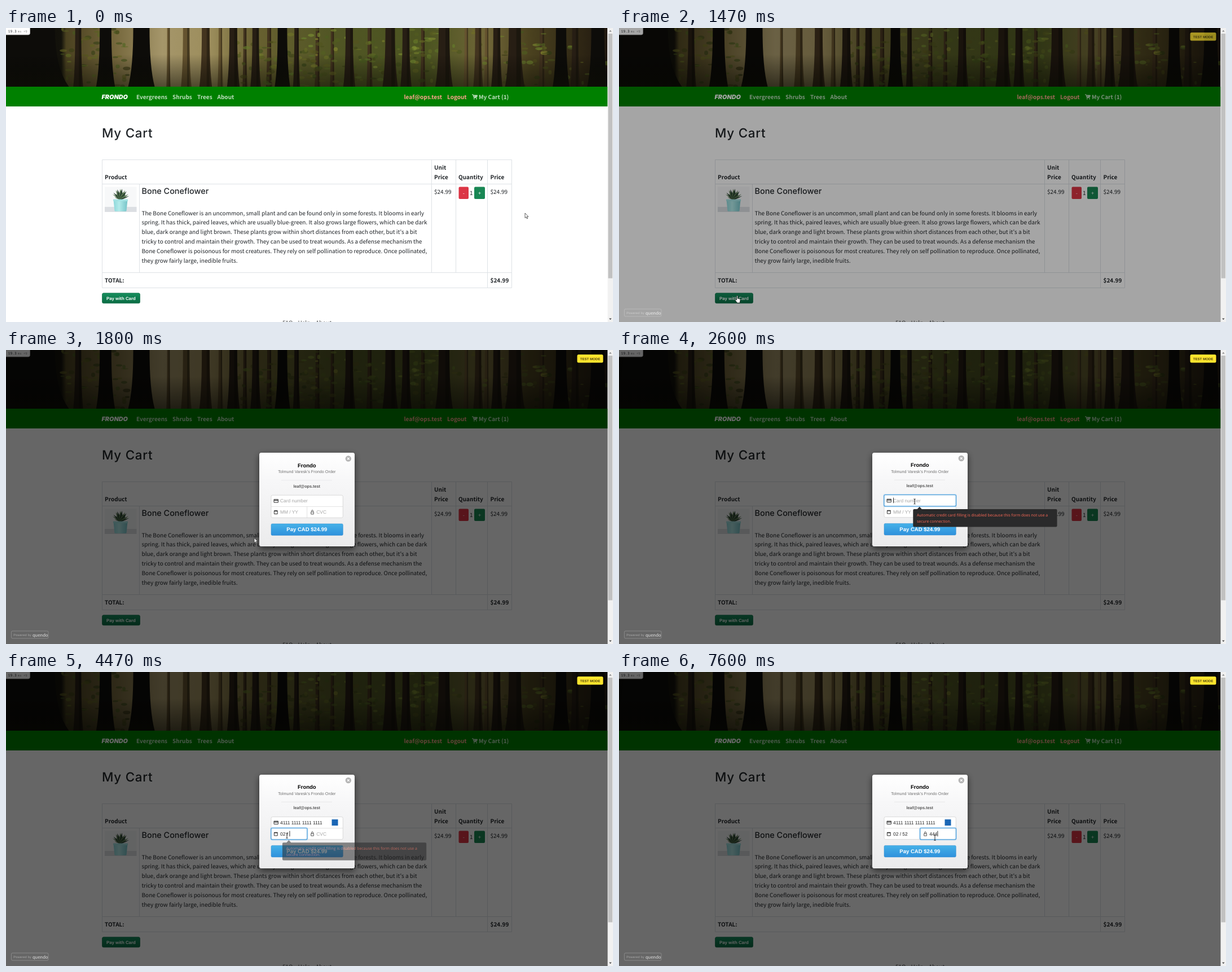
Recreate the animation shown at these times as an HTML page. Size 1076 px wide and 521 px high, loop 8000 ms.

```html
<!DOCTYPE html>
<html lang="en">
<head>
<meta charset="utf-8">
<title>Cart checkout</title>
<style>
html,body{margin:0;width:100%;height:100%;overflow:hidden;background:#fff}
svg{display:block;width:100vw;height:100vh}
text{font:10.02px "Noto Sans CJK JP","Noto Sans CJK SC","Noto Sans CJK","Noto Sans",sans-serif;fill:#212529;text-rendering:geometricPrecision;white-space:pre}
.b{font-weight:700}
.nav text{font-weight:700;fill:#bfdfbf}
.nav .user{fill:#ffa38f}
.head{font-family:Inter,sans-serif;font-weight:500}
.ui,.ui text{font-family:"Liberation Sans",Arial,sans-serif}
.mid{text-anchor:middle}
.mono{font:6.2px "Noto Sans Mono","DejaVu Sans Mono",monospace}
.field{font-size:8.4px}
.hint text{font:6.92px "Open Sans","Noto Sans",sans-serif;fill:#ff6b58}
.line{fill:none;stroke:#dee2e6}
.icon{fill:none;stroke:#333}
</style>
</head>
<body>
<svg viewBox="0 0 1076 521" preserveAspectRatio="none">
<defs>
  <linearGradient id="sky" gradientUnits="userSpaceOnUse" x1="0" x2="1066">
    <stop offset="0" stop-color="#0b0b08"/><stop offset=".092" stop-color="#13120b"/>
    <stop offset=".1" stop-color="#4a4120"/><stop offset=".18" stop-color="#75673c"/>
    <stop offset=".26" stop-color="#a5966a"/><stop offset=".34" stop-color="#9c8d5c"/>
    <stop offset=".41" stop-color="#696131"/><stop offset=".55" stop-color="#505524"/>
    <stop offset=".7" stop-color="#4c5421"/><stop offset=".8" stop-color="#706638"/>
    <stop offset=".87" stop-color="#4b421f"/><stop offset="1" stop-color="#20180f"/>
  </linearGradient>
  <linearGradient id="shade" x2="0" y2="1">
    <stop offset=".45" stop-color="#000" stop-opacity="0"/><stop offset="1" stop-color="#0d0e04" stop-opacity=".55"/>
  </linearGradient>
  <linearGradient id="green" x2="0" y2="1"><stop stop-color="#158e5d"/><stop offset="1" stop-color="#0a6b43"/></linearGradient>
  <linearGradient id="blue" x2="0" y2="1"><stop stop-color="#45b1e8"/><stop offset="1" stop-color="#2f91dc"/></linearGradient>
  <linearGradient id="panel" x2="0" y2="1"><stop stop-color="#fff"/><stop offset=".3" stop-color="#f7f7f8"/><stop offset="1" stop-color="#ebebec"/></linearGradient>
  <linearGradient id="pot" x2="1" y2="0"><stop stop-color="#8ed7da"/><stop offset=".4" stop-color="#b3ebea"/><stop offset="1" stop-color="#76c3c8"/></linearGradient>
  <clipPath id="banner"><path d="M0 0H1066V104H0z"/></clipPath>
  <filter id="drop" x="-20%" y="-20%" width="140%" height="150%"><feDropShadow dx="0" dy="4" stdDeviation="6" flood-opacity=".6"/></filter>
  <path id="arrow" d="M0 0V8.6L2 6.8 3.4 10 4.8 9.4 3.4 6.3H6z" fill="#fff" stroke="#222" stroke-width=".7"/>
  <path id="hand" d="M-.8 7V.6C-.8-.4 1-.4 1 .6V5L4.6 5.6Q5.8 6 5.5 7.4L4.6 12.6H0L-3.2 8.2C-3.4 6.8-2 6.3-.8 7.6z" fill="#fff" stroke="#111" stroke-width=".7"/>
  <path id="beam" d="M-1.6-4.6Q0-4.6 0-3.8Q0-4.6 1.6-4.6M0-4V4M-1.6 4.6Q0 4.6 0 3.8Q0 4.6 1.6 4.6" fill="none" stroke="#111" stroke-width=".9"/>
</defs>

<g clip-path="url(#banner)">
  <path d="M0 0H1066V104H0z" fill="url(#sky)"/>
  <g id="wood"></g>
  <path d="M0 0H1066V104H0z" fill="url(#shade)"/>
</g>
<path d="M0 104H1066.5V139H0z" fill="green"/>
<g class="nav">
  <text x="169.5" y="125.8" style="font:italic 900 10.8px Inter,sans-serif;fill:#fff">FRONDO</text>
  <text x="231" y="126">Evergreens</text><text x="295" y="126">Shrubs</text>
  <text x="339" y="126">Trees</text><text x="374.5" y="126">About</text>
  <text class="user" x="773" y="126" text-anchor="end">leaf@ops.test</text>
  <text class="user" x="782" y="126">Logout</text>
  <path d="M826 118H828L829.4 123.5H834.6M828.4 119.2H835.4L834.8 122H829z" fill="#bfdfbf" stroke="#bfdfbf"/>
  <circle cx="829.8" cy="125.6" r="1" fill="#bfdfbf"/><circle cx="834" cy="125.6" r="1" fill="#bfdfbf"/>
  <text x="838" y="126">My Cart (1)</text>
</g>

<text class="head" x="170" y="194" style="font-size:22.4px;letter-spacing:.75px">My Cart</text>
<path class="line" d="M170.5 233.5H896.5V460.5H170.5zM170.5 276.5H896.5M170.5 433.5H896.5M236.5 276.5V433.5M754.5 233.5V433.5M797.5 233.5V433.5M853.5 233.5V460.5"/>
<g class="b">
  <text class="b" x="175" y="268">Product</text>
  <text class="b" x="759" y="251">Unit</text><text class="b" x="759" y="268">Price</text>
  <text class="b" x="802" y="268">Quantity</text><text class="b" x="858.5" y="268">Price</text>
  <text class="b" x="175" y="451">TOTAL:</text><text class="b" x="858.5" y="451">$24.99</text>
</g>
<text x="759" y="294">$24.99</text><text x="858.5" y="294">$24.99</text>
<rect x="802.5" y="281.5" width="17.5" height="21.5" rx="2" fill="#dc3545"/>
<rect x="830" y="281.5" width="19" height="21.5" rx="2" fill="#198754"/>
<text class="mid" x="811.2" y="295.6" style="fill:#fff;font-size:9px">-</text>
<text class="mid" x="839.5" y="295.6" style="fill:#fff;font-size:9px">+</text>
<text x="822" y="295.6">1</text>

<path d="M175 281.5H231.5V326H175z" fill="#f7f8f9"/>
<path d="M175 317H231.5V326H175z" fill="#dcdfe3"/>
<g id="plant"></g>
<path d="M190.5 304H215.5L213.6 323.5Q213.4 325 211.5 325H194.5Q192.6 325 192.4 323.5z" fill="url(#pot)"/>
<path d="M190 303.4H216V307H190.3z" fill="#a3e2e3"/>

<text class="head" x="240.5" y="294" style="font-size:14.4px">Bone Coneflower</text>
<g id="blurb"></g>

<rect x="170.5" y="469.8" width="67" height="18" rx="2.5" fill="url(#green)" stroke="#0b6b44" stroke-width=".7"/>
<text class="ui mid b" x="203.9" y="481.7" style="font-size:7.84px;fill:#fff">Pay with Card</text>
<g style="opacity:.8"><text x="490" y="525.6">FAQ</text><text x="517.5" y="525.6">Help</text><text x="549" y="525.6">About</text></g>

<path d="M-1-1H42.5V9Q42.5 12 39.5 12H-1z" fill="#fff" stroke="#bbb" stroke-width=".8"/>
<text class="mono" x="3.8" y="8">19.3</text>
<text class="mono" x="20.8" y="8" style="font-size:5.6px;fill:#888">ms</text>
<text class="mono" x="31" y="8" style="font-size:5.6px;fill:#888">+9</text>

<path d="M1066.5 0H1076V521H1066.5z" fill="#f1f1f1"/>
<path d="M1067.5 10H1075V443.5H1067.5z" fill="#c1c1c1"/>
<path d="M1069 6.5H1073.6L1071.3 3.8z" fill="#888"/><path d="M1069 514.5H1073.6L1071.3 517.2z" fill="#505050"/>

<g id="veil" class="ui">
  <path d="M0 0H1066.5V521H0z" opacity=".6"/>
  <rect x="1012.5" y="8" width="46" height="14.5" rx="2.5" fill="#ffe52e"/>
  <text class="mid b" x="1035.5" y="17.5" style="font-size:6.1px;fill:#4d4510">TEST MODE</text>
  <rect x="9.5" y="498" width="65.5" height="13" rx="2" fill="none" stroke="#fff" stroke-opacity=".28" stroke-width=".8"/>
  <text x="13.3" y="506.6" style="font-size:5.6px;fill:#aaa;letter-spacing:.22px">Powered by</text>
  <text x="47" y="508" style="font:600 8.2px Lato,sans-serif;fill:#ccc">quendo</text>
</g>

<g id="modal" class="ui">
  <rect x="449" y="182" width="169" height="166" rx="3.5" fill="url(#panel)" filter="url(#drop)"/>
  <g id="inner">
    <circle cx="606.8" cy="192" r="5.2" fill="#b5b5b5"/>
    <path d="M604.9 190.1L608.7 193.9M608.7 190.1L604.9 193.9" stroke="#fff" stroke-width="1.2"/>
    <text class="mid b" x="533.3" y="207" style="font-size:9.52px;fill:#000">Frondo</text>
    <text class="mid" x="533.3" y="217.7" style="font-size:7.28px;fill:#707070">Tolmund Varesk's Frondo Order</text>
    <path d="M488 230.3H578" stroke="#e3e3e4" stroke-width=".7"/>
    <text class="mid b" x="533.3" y="243" style="font-size:7.28px;fill:#555">leaf@ops.test</text>
    <rect x="470" y="256.7" width="127.3" height="40" rx="2.5" fill="#fff" stroke="#ccc" stroke-width=".7"/>
    <path d="M470 276.8H597.3M533.6 276.8V296.7" stroke="#d4d4d4" stroke-width=".7"/>
    <rect id="badge" x="577.5" y="261.2" width="11" height="11" fill="#1a66b5"/>
    <g id="fields"></g>
    <path class="icon" d="M475 264.2H482.4V269.6H475z"/><path class="icon" d="M475 265.9H482.4" stroke-width="1.4"/>
    <path class="icon" d="M475.4 284.3H481.2V290H475.4z"/><path class="icon" d="M475.4 284.8H481.2" stroke-width="1.5"/>
    <path class="icon" d="M540.7 286.4H545.3V290.3H540.7zM541.5 286.2V285Q541.5 283.2 543 283.2T544.5 285V286.2" style="stroke:#555"/>
    <rect x="470" y="307.4" width="127.3" height="20.6" rx="2" fill="url(#blue)" stroke="#2d87cb" stroke-width=".5"/>
    <text class="mid b" x="533.3" y="320.5" style="font-size:9.52px;fill:#fff">Pay CAD $24.99</text>
  </g>
</g>

<g id="hint" class="hint">
  <path d="M523.5 282H528.7L532.7 277.8 536.7 282H774.5Q776.6 282 776.6 284V311.5Q776.6 313.5 774.5 313.5H523.5Q521.3 313.5 521.3 311.5V284Q521.3 282 523.5 282z" fill="#2a2a2b"/>
  <text x="528" y="295.2">Automatic credit card filling is disabled because this form does not use a</text>
  <text x="528" y="306.2">secure connection.</text>
</g>
<use id="cursor"/>
</svg>

<script>
const $ = id => document.getElementById(id);
function add(parent, tag, attrs, content = "") {
  const el = document.createElementNS("http://www.w3.org/2000/svg", tag);
  for (const k in attrs) el.setAttribute(k, attrs[k]);
  el.textContent = content;
  return parent.appendChild(el);
}
const clamp = v => Math.max(0, Math.min(1, v));
const ramp = (t, a, b) => clamp((t - a) / (b - a));

let seed = 11;
const rnd = () => (seed = seed * 16807 % 2147483647) / 2147483647;

function leaves(n, x0, x1, y0, y1, light) {
  for (let i = 0; i < n; i++) {
    const x = x0 + rnd() * (x1 - x0), y = y0 + rnd() * (y1 - y0);
    add($("wood"), "ellipse", {cx: x, cy: y, rx: 2 + rnd() * 5, ry: 1 + rnd() * 3,
      fill: `hsl(${58 + rnd() * 22} 48% ${light + rnd() * 16}%)`, opacity: .65});
  }
}
function trunks(list) {
  const bark = ["#0d0c09", "#271e14", "#43341f", "#65532f"];
  for (const [x, w, tone] of list) {
    const r = x + w, f = w * .12;
    add($("wood"), "path", {d: `M${x + f} 0H${r - f}Q${r - f} 70 ${r + f} 104H${x - f}Q${x + f} 70 ${x + f} 0`, fill: bark[tone]});
    if (tone) add($("wood"), "path", {d: `M${x + w * .6} 0H${r - f}V104H${x + w * .6}z`, fill: "#0b0905", opacity: .35});
  }
}
trunks([[285, 6, 3], [312, 15, 3], [345, 18, 2], [376, 8, 3], [420, 7, 2], [462, 9, 2], [548, 8, 2],
  [575, 7, 2], [640, 9, 2], [735, 8, 2], [812, 8, 3], [848, 8, 3], [945, 10, 2]]);
leaves(60, 100, 215, 0, 104, 15);
leaves(170, 395, 770, 20, 104, 17);
leaves(90, 500, 960, 0, 75, 22);
leaves(40, 880, 1066, 30, 104, 14);
trunks([[-5, 104, 0], [121, 14, 1], [163, 27, 0], [221, 38, 0], [394, 18, 1], [435, 15, 1], [479, 22, 0],
  [510, 10, 1], [600, 17, 1], [670, 22, 1], [701, 16, 1], [764, 25, 1], [830, 14, 2], [862, 16, 1],
  [888, 28, 1], [972, 24, 0], [1002, 14, 1], [1034, 30, 0]]);

for (let i = 0; i < 15; i++) {
  const a = -2.8 + i * .175, len = 13 + 7 * Math.abs(Math.sin(i * 2.1));
  const x = 203 + Math.cos(a) * len * .85, y = 304 + Math.sin(a) * len;
  add($("plant"), "path", {d: `M200.6 304Q${(201 + x) / 2 - 2} ${(303 + y) / 2} ${x} ${y}Q${(205 + x) / 2 + 2} ${(304 + y) / 2} 205.4 304z`,
    fill: ["#3d5a3c", "#5f7d55", "#2b4433"][i % 3]});
}

["The Bone Coneflower is an uncommon, small plant and can be found only in some forests. It blooms in early",
 "spring. It has thick, paired leaves, which are usually blue-green. It also grows large flowers, which can be dark",
 "blue, dark orange and light brown. These plants grow within short distances from each other, but it's a bit",
 "tricky to control and maintain their growth. They can be used to treat wounds. As a defense mechanism the",
 "Bone Coneflower is poisonous for most creatures. They rely on self pollination to reproduce. Once pollinated,",
 "they grow fairly large, inedible fruits."
].forEach((s, i) => add($("blurb"), "text", {x: 240.5, y: 331.6 + i * 16.8}, s));

// Text of a field: the last step whose time has passed.
const typed = (t, steps) => steps.reduce((s, [at, v]) => t >= at ? v : s, "");
const digits = "4111 1111 1111 1111";
const fields = [
  {box: [470, 256.7, 127.3], x: 486, hold: "Card number", from: 2470, to: 3400,
    value: t => digits.slice(0, t < 2800 ? 0 : 1 + (t - 2800) / 15)},
  {box: [470, 276.7, 63.8], x: 486, hold: "MM / YY", from: 3400, to: 6570,
    value: t => typed(t, [[4200, "0"], [4400, "02 / "], [4600, "02 / 5"], [5530, "02 / 52"]])},
  {box: [533.8, 276.7, 63.5], x: 550.3, hold: "CVC", from: 6570, to: 8000,
    value: t => typed(t, [[7200, "4"], [7400, "44"], [7600, "444"]])}
];
const caretOff = [[3930, 4200], [4930, 5470], [6070, 6570], [7070, 7200]];
for (const f of fields) {
  const [x, y, width] = f.box;
  f.glow = add($("fields"), "g", {});
  add(f.glow, "rect", {x, y, width, height: 20, rx: 2, fill: "none", stroke: "#6cb5ee", "stroke-opacity": .4, "stroke-width": 3.4});
  add(f.glow, "rect", {x, y, width, height: 20, rx: 2, fill: "#fff", stroke: "#3f97d6", "stroke-width": 1.1});
  f.label = add($("fields"), "text", {class: "field", x: f.x, y: y + 12.8});
  f.caret = add($("fields"), "path", {stroke: "#111", "stroke-width": .9});
}

const path = [[70, 920, 328], [250, 868, 310], [500, 560, 350], [700, 350, 418], [870, 240, 462], [1130, 209.5, 474.5],
  [1500, 209.5, 474.5], [1800, 440, 333], [1990, 449, 346], [2130, 442, 350], [2420, 524, 268.5], [3130, 524, 268.5],
  [3400, 498, 290], [6070, 498, 290], [6240, 550, 327], [6370, 592, 336], [6500, 577, 305], [6670, 560, 294]];
function cursorAt(t) {
  const i = path.findIndex(p => p[0] > t);
  if (i < 0) return path.at(-1).slice(1);
  if (!i) return path[0].slice(1);
  const [t0, x0, y0] = path[i - 1], [t1, x1, y1] = path[i], k = (t - t0) / (t1 - t0);
  return [x0 + (x1 - x0) * k, y0 + (y1 - y0) * k];
}
function cursorShape(t, x, y) {
  const inside = (l, top, r, b) => x > l && x < r && y > top && y < b;
  if (t < 1600) return inside(170, 470, 238, 488) ? "hand" : "arrow";
  if (inside(470, 257, 597, 297)) return "beam";
  return inside(470, 307, 597, 328) ? "hand" : "arrow";
}

function draw() {
  // The screen refreshes 15 times a second.
  const t = Math.floor(performance.now() % 8000 * .015 + .06) / .015 + 1;

  $("veil").setAttribute("opacity", ramp(t, 1250, 1620));
  $("modal").setAttribute("opacity", ramp(t, 1600, 1740));
  $("inner").setAttribute("transform", `translate(0 ${6 * (1 - ramp(t, 1600, 2130)) ** 5})`);
  $("badge").setAttribute("opacity", t >= 2800 ? 1 : 0);

  for (const f of fields) {
    const value = f.value(t), focus = t >= f.from && t < f.to;
    f.label.textContent = value || f.hold;
    f.label.style.fill = value ? "#222" : "#a5a5a5";
    f.glow.setAttribute("opacity", focus ? 1 : 0);
    const shown = focus && !caretOff.some(([a, b]) => t >= a && t < b);
    const x = f.x + .6 + (value ? f.label.getComputedTextLength() : 0);
    f.caret.setAttribute("d", shown ? `M${x} ${f.box[1] + 5}v9.6` : "");
  }

  $("hint").setAttribute("opacity", ramp(t, 2440, 2600) - ramp(t, 2760, 3000) + ramp(t, 3390, 3530) - ramp(t, 4360, 4600));
  $("hint").setAttribute("transform", t > 3200 ? "translate(-31.4 20.2)" : "");

  const [x, y] = cursorAt(t);
  $("cursor").setAttribute("href", "#" + cursorShape(t, x, y));
  $("cursor").setAttribute("transform", `translate(${x} ${y})`);
  requestAnimationFrame(draw);
}
draw();
</script>
</body>
</html>
```
